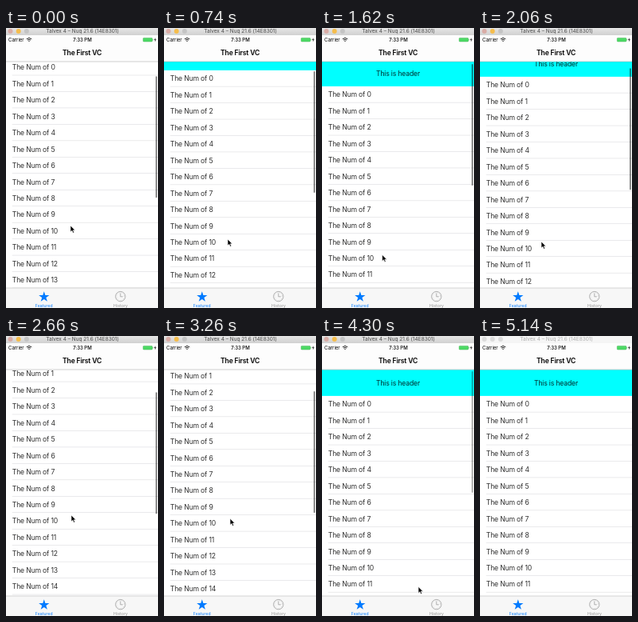
Animation of 191 by 350 pixels, one loop 5240 ms. Source, as an HTML page:

```html
<!DOCTYPE html>
<html lang="en">
<head>
<meta charset="utf-8">
<title>List with header</title>
<style>
  html, body { margin: 0; width: 100%; height: 100%; overflow: hidden; background: #fff; }
  svg { display: block; width: 191px; height: 350px; }
  text { font-family: Inter, "Liberation Sans", sans-serif; fill: #000; }
  .mid { text-anchor: middle; }
  .body { font-size: 8.66px; letter-spacing: -.19px; }
  .thin { fill-opacity: .82; }
  .bold { font-weight: 600; }
  .status { font-size: 6.1px; letter-spacing: -.05px; }
  .tab { font-size: 5.1px; letter-spacing: .1px; }
</style>
</head>
<body>
<svg viewBox="0 0 191 350">
  <defs>
    <clipPath id="view"><rect y="42" width="191" height="283"/></clipPath>
    <linearGradient id="chrome" x2="0" y2="1">
      <stop stop-color="#e6e6e6"/><stop offset="1" stop-color="#d0d0d0"/>
    </linearGradient>
  </defs>
  <rect width="191" height="350" fill="#fff"/>

  <g clip-path="url(#view)">
    <rect id="gap" y="42" width="191" height="34" fill="#b2b2b6"/>
    <g id="list">
      <rect width="191" height="360" fill="#fff"/>
      <rect y="-32.7" width="191" height="32.7" fill="#0ff"/>
      <text class="body thin mid" x="95.5" y="-12.9">This is header</text>
    </g>
    <rect id="bar" x="188" width="1.8" rx=".9" fill="#000"/>
  </g>

  <rect y="9" width="191" height="33" fill="#fdfdfd"/>
  <rect y="41.7" width="191" height=".6" fill="#b0b0b0"/>
  <text class="status" x="3" y="17">Carrier</text>
  <g fill="none" stroke="#111" stroke-width=".9">
    <path d="M25.8 13.8q3.2-2.9 6.4 0M27 15.2q2-1.8 4 0"/>
    <circle cx="29" cy="16.4" r=".3"/>
  </g>
  <text class="status mid" x="96" y="17" font-weight="500">7:33 PM</text>
  <rect x="172.3" y="12.4" width="11.6" height="4.7" rx=".9" fill="#4cd964" stroke="#3aa94c" stroke-width=".4"/>
  <rect x="184.4" y="13.9" width=".8" height="1.7" rx=".4" fill="#4cb85e"/>
  <path d="M187.9 12.2L186 15.1H187.3L186.9 17.3 188.9 14.3H187.6Z" fill="#222"/>
  <text class="body bold mid" x="95.6" y="34.2">The First VC</text>

  <rect y="325" width="191" height="25" fill="#f7f7f7"/>
  <rect y="324.7" width="191" height=".6" fill="#b8b8b8"/>
  <path id="star" fill="#007aff"/>
  <text class="tab mid" x="47.8" y="348.8" style="fill:#007aff">Featured</text>
  <g fill="none" stroke="#929292" stroke-width=".7">
    <circle cx="143.8" cy="335.6" r="6.2"/>
    <circle cx="143.8" cy="335.6" r="4.9" stroke-dasharray=".5 2.066"/>
    <path d="M143.8 331.6v4.2h3"/>
  </g>
  <text class="tab mid" x="144" y="348.8" style="fill:#929292">History</text>

  <rect id="chromeBar" width="191" height="9"/>
  <circle class="light" cx="5.5" cy="4" r="3"/>
  <circle class="light" cx="15.7" cy="4" r="3"/>
  <circle class="light" cx="25.9" cy="4" r="3"/>
  <text id="caption" class="mid" x="96" y="6.3" font-size="6.5">Talvex 4 – Nuq 21.6 (14E8301)</text>

  <path id="cursor" d="M0 0V8L1.9 6.3 3.2 9.2 4.6 8.6 3.3 5.8H5.8Z" fill="#000" stroke="#fff" stroke-width=".6"/>
</svg>
<script>
const LOOP = 5240, STEP = 148, LEAD = 12;
const ROW = 20.46, HEAD = 32.7, REST = 74.9;
const $ = id => document.getElementById(id);

// Turning points of the drag: step, top of first row, pointer x, pointer y
const KEYS = [
  [0, 38.8, 81, 247],
  [5, 52.9, 80, 264],
  [8, 71.2, 76, 283],
  [10, 74, 75.5, 285],
  [14, 60.9, 77, 267],
  [18, 16.4, 82, 224],
  [20, 8.5, 82.5, 216],
  [21, 8.5, 82.5, 216],
  [25, 77.4, 86, 294],
  [26, 77.4, 86, 294],
  [28, REST, 98, 301],
  [32, REST, 210, 360]
];

const slope = (i, c) => (KEYS[i + 1][c] - KEYS[i][c]) / (KEYS[i + 1][0] - KEYS[i][0]);

// Flat at turns, harmonic mean of the neighbouring slopes elsewhere
function tangent(i, c) {
  if (i === 0 || i === KEYS.length - 1) return 0;
  const a = slope(i - 1, c), b = slope(i, c);
  return a * b <= 0 ? 0 : 2 * a * b / (a + b);
}

// Monotone cubic through column c
function glide(k, c) {
  const last = KEYS.length - 1;
  if (k >= KEYS[last][0]) return KEYS[last][c];
  const i = KEYS.findLastIndex(p => p[0] <= k);
  const [p, q] = [KEYS[i], KEYS[i + 1]];
  const h = q[0] - p[0], u = (k - p[0]) / h, v = 1 - u;
  return v * v * (1 + 2 * u) * p[c] + u * u * (1 + 2 * v) * q[c]
    + h * u * v * (v * tangent(i, c) - u * tangent(i + 1, c));
}

function add(parent, tag, attrs, label = '') {
  const el = document.createElementNS('http://www.w3.org/2000/svg', tag);
  for (const k in attrs) el.setAttribute(k, attrs[k]);
  el.textContent = label;
  parent.append(el);
}

for (let i = 0; i < 17; i++) {
  add($('list'), 'text', { class: 'body thin', x: 7.8, y: i * ROW + 13.5 }, 'The Num of ' + i);
  add($('list'), 'rect', { x: 7.7, y: (i + 1) * ROW - .5, width: 184, height: .5, fill: '#d4d4d8' });
}

const points = Array.from({ length: 10 }, (_, i) => {
  const r = i % 2 ? 2.7 : 7, a = i * Math.PI / 5;
  return [47.8 + r * Math.sin(a), 336.2 - r * Math.cos(a)].map(v => v.toFixed(2));
});
$('star').setAttribute('d', 'M' + points.join('L') + 'Z');

const lights = [...document.querySelectorAll('.light')];
const lit = ['#d9aca6', '#f5bd4c', '#c4c4c4'];

function draw(now) {
  const t = now % LOOP;
  const k = Math.floor((t + LEAD) / STEP);
  const top = glide(k, 1), offset = REST - top;
  $('list').setAttribute('transform', `translate(0 ${top})`);
  $('gap').setAttribute('height', Math.max(0, top - HEAD - 42));
  $('bar').setAttribute('y', 44 + .45 * Math.max(0, offset));
  $('bar').setAttribute('height', 152 + Math.min(0, offset));
  $('bar').setAttribute('opacity', .5 * Math.min(1, Math.max(0, (31 - k) / 3)));
  $('cursor').setAttribute('transform', `translate(${glide(k, 2)} ${glide(k, 3)})`);

  const active = t < 5140;
  $('chromeBar').setAttribute('fill', active ? 'url(#chrome)' : '#f5f5f5');
  $('caption').style.fill = active ? '#4a4a4a' : '#b0b0b0';
  lights.forEach((el, i) => el.setAttribute('fill', active ? lit[i] : '#dcdcdc'));
}

function tick() {
  draw(performance.now());
  requestAnimationFrame(tick);
}
tick();
</script>
</body>
</html>
```
